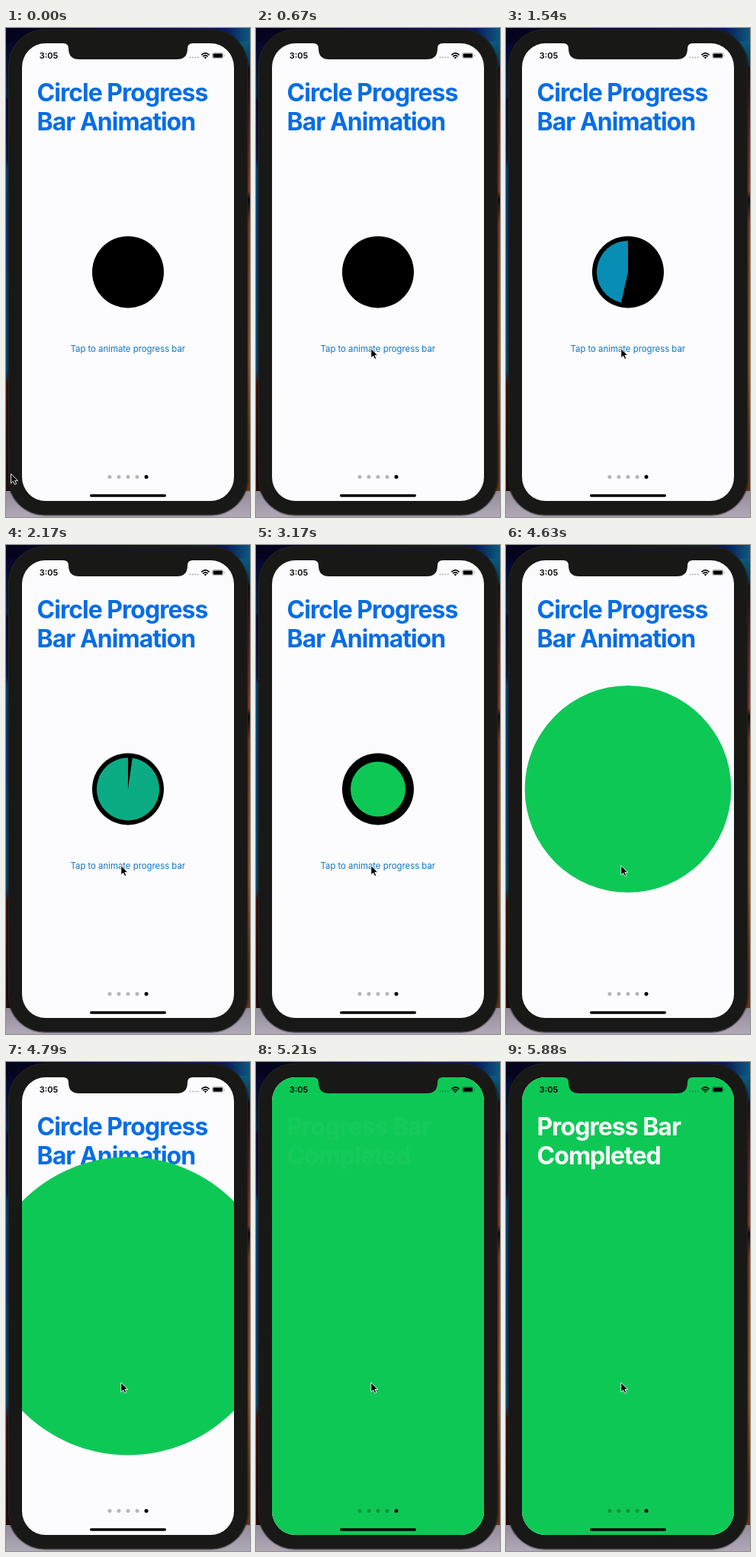
Write an HTML page that moves like this. It is 320 px wide and 640 px high and loops after 5.93 s.

```html
<!DOCTYPE html>
<html lang="en">
<head>
<meta charset="utf-8">
<title>Circle progress</title>
<style>
  html, body { margin: 0; width: 100%; height: 100%; overflow: hidden; background: #06061c; }
  svg { display: block; width: 100vw; height: 100vh; }
  text { font-family: Inter, "Liberation Sans", sans-serif; font-optical-sizing: none; }
  .title { font-size: 32px; font-weight: 700; letter-spacing: -1px; }
  .hint { font-size: 11.4px; letter-spacing: -.02px; fill: #1276c4; text-anchor: middle; }
  .clock { font-size: 11px; font-weight: 600; }
</style>
</head>
<body>
<svg viewBox="0 0 320 640">
  <defs>
    <linearGradient id="top">
      <stop offset="0" stop-color="#04041c"/>
      <stop offset=".5" stop-color="#08083c"/>
      <stop offset=".9" stop-color="#0a1a58"/>
      <stop offset="1" stop-color="#0c5a80"/>
    </linearGradient>
    <linearGradient id="left" x2="0" y2="1">
      <stop offset="0" stop-color="#05052a"/>
      <stop offset=".12" stop-color="#0a2a50"/>
      <stop offset=".13" stop-color="#0a0a38"/>
      <stop offset=".26" stop-color="#0a1c4a"/>
      <stop offset=".28" stop-color="#0a4474"/>
      <stop offset=".45" stop-color="#0b3f80"/>
      <stop offset=".73" stop-color="#0c4a70"/>
      <stop offset=".76" stop-color="#421210"/>
      <stop offset=".94" stop-color="#220c0c"/>
    </linearGradient>
    <linearGradient id="right" x2="0" y2="1">
      <stop offset="0" stop-color="#0a5a80"/>
      <stop offset=".05" stop-color="#0a3a50"/>
      <stop offset=".06" stop-color="#201018"/>
      <stop offset=".2" stop-color="#6a2620"/>
      <stop offset=".33" stop-color="#a03a24"/>
      <stop offset=".35" stop-color="#140c0c"/>
      <stop offset=".4" stop-color="#8a3c1c"/>
      <stop offset=".7" stop-color="#a4581c"/>
      <stop offset=".9" stop-color="#6a3414"/>
    </linearGradient>
    <linearGradient id="desk" x2="0" y2="1">
      <stop offset="0" stop-color="#938b9a"/>
      <stop offset="1" stop-color="#b2a9b8"/>
    </linearGradient>
    <clipPath id="screen"><rect x="21" y="20" width="278" height="599" rx="31"/></clipPath>
  </defs>

  <rect width="320" height="20" fill="url(#top)"/>
  <rect y="18" width="20" height="590" fill="url(#left)"/>
  <rect x="300" y="18" width="20" height="590" fill="url(#right)"/>
  <rect y="606" width="320" height="34" fill="url(#desk)"/>
  <rect x="1.5" y="1" width="317" height="638" rx="50" opacity=".3"/>
  <rect x="3.5" y="2" width="313" height="635" rx="47" fill="#181816" stroke="#252523"/>

  <g clip-path="url(#screen)">
    <rect x="21" y="20" width="278" height="599" fill="#fcfcfe"/>
    <g class="title" fill="#056de6">
      <text x="40.6" y="96">Circle Progress</text>
      <text x="40.6" y="134">Bar Animation</text>
    </g>
    <text class="hint" x="159.8" y="424">Tap to animate progress bar</text>
    <circle cx="160" cy="319.4" r="47"/>
    <path id="pie"/>
    <g id="done" class="title" fill="#fcfdfa">
      <text x="40.6" y="96">Progress Bar</text>
      <text x="40.6" y="134">Completed</text>
    </g>
    <path fill="#181816" d="M75 19V20Q82 20 82 27Q82 41 96 41H224Q238 41 238 27Q238 20 245 20V19Z"/>

    <text class="clock" x="43.7" y="40">3:05</text>
    <g id="signal" opacity=".3"></g>
    <path d="M256.4 35.3Q261.5 30.4 266.6 35.3M258.3 37.3Q261.5 34.3 264.7 37.3" fill="none" stroke="#000" stroke-width="1.6"/>
    <path d="M259.7 38.6Q261.5 37 263.3 38.6L261.5 40.4Z"/>
    <rect x="270.5" y="32.5" width="14.5" height="7.2" rx="2" fill="none" stroke="#000" stroke-opacity=".4" stroke-width=".7"/>
    <rect x="271.6" y="33.5" width="12.3" height="5.2" rx="1.1"/>
    <path d="M286 34.8Q287.5 36.1 286 37.4Z" opacity=".5"/>
    <g id="dots"></g>
    <rect x="110" y="610.3" width="100" height="3.4" rx="1.7"/>
  </g>

  <path id="cursor" d="M0 0V12.3L2.9 9.7L5 14L7.1 13L5.1 8.9H9Z" stroke="#fff" stroke-width=".9" stroke-linejoin="round"/>
</svg>
<script>
const LOOP = 5930, CX = 160, CY = 319.4;
const BLUE = [5, 109, 230], GREEN = [14, 200, 86];
const $ = id => document.getElementById(id);
const lerp = (a, b, k) => a + (b - a) * k;
const phase = (t, from, to) => Math.min(1, Math.max(0, (t - from) / (to - from)));
const ease = k => k * k * (3 - 2 * k);
const eased = (t, from, to) => ease(phase(t, from, to));

function addDot(parent, cx, cy, r, opacity) {
  const dot = document.createElementNS('http://www.w3.org/2000/svg', 'circle');
  for (const [name, value] of Object.entries({ cx, cy, r, opacity })) dot.setAttribute(name, value);
  parent.append(dot);
}
for (let i = 0; i < 4; i++) addDot($('signal'), 241.6 + i * 3.4, 38.5, 1, 1);
for (let i = 0; i < 5; i++) addDot($('dots'), 136 + i * 12, 587.5, 2.5, i === 4 ? 1 : .28);

// The slice grows counter-clockwise from twelve o'clock.
function piePath(r, share) {
  if (share <= 0) return '';
  const top = `${CX} ${CY - r}`;
  if (share >= 1) return `M${top}A${r} ${r} 0 1 0 ${CX} ${CY + r}A${r} ${r} 0 1 0 ${top}Z`;
  const angle = share * 2 * Math.PI;
  const x = CX - r * Math.sin(angle), y = CY - r * Math.cos(angle);
  return `M${CX} ${CY}L${top}A${r} ${r} 0 ${share > .5 ? 1 : 0} 0 ${x} ${y}Z`;
}

function draw(t) {
  const move = eased(t, 40, 600);
  $('cursor').setAttribute('transform', `translate(${lerp(6.5, 150.8, move)} ${lerp(583.5, 419.5, move)})`);

  const share = eased(t, 850, 2300);
  const shrunk = lerp(41, 36, eased(t, 2250, 3100));
  const radius = lerp(shrunk, 400, eased(t, 4150, 5550));
  const tint = phase(t, 900, 2750);
  const color = BLUE.map((c, i) => Math.round(lerp(c, GREEN[i], tint)));
  $('pie').setAttribute('d', piePath(radius, share));
  $('pie').setAttribute('fill', `rgb(${color})`);

  $('done').setAttribute('opacity', eased(t, 5150, 5750));
}

const start = performance.now();
function tick() {
  draw((performance.now() - start) % LOOP);
  requestAnimationFrame(tick);
}
tick();
</script>
</body>
</html>
```
